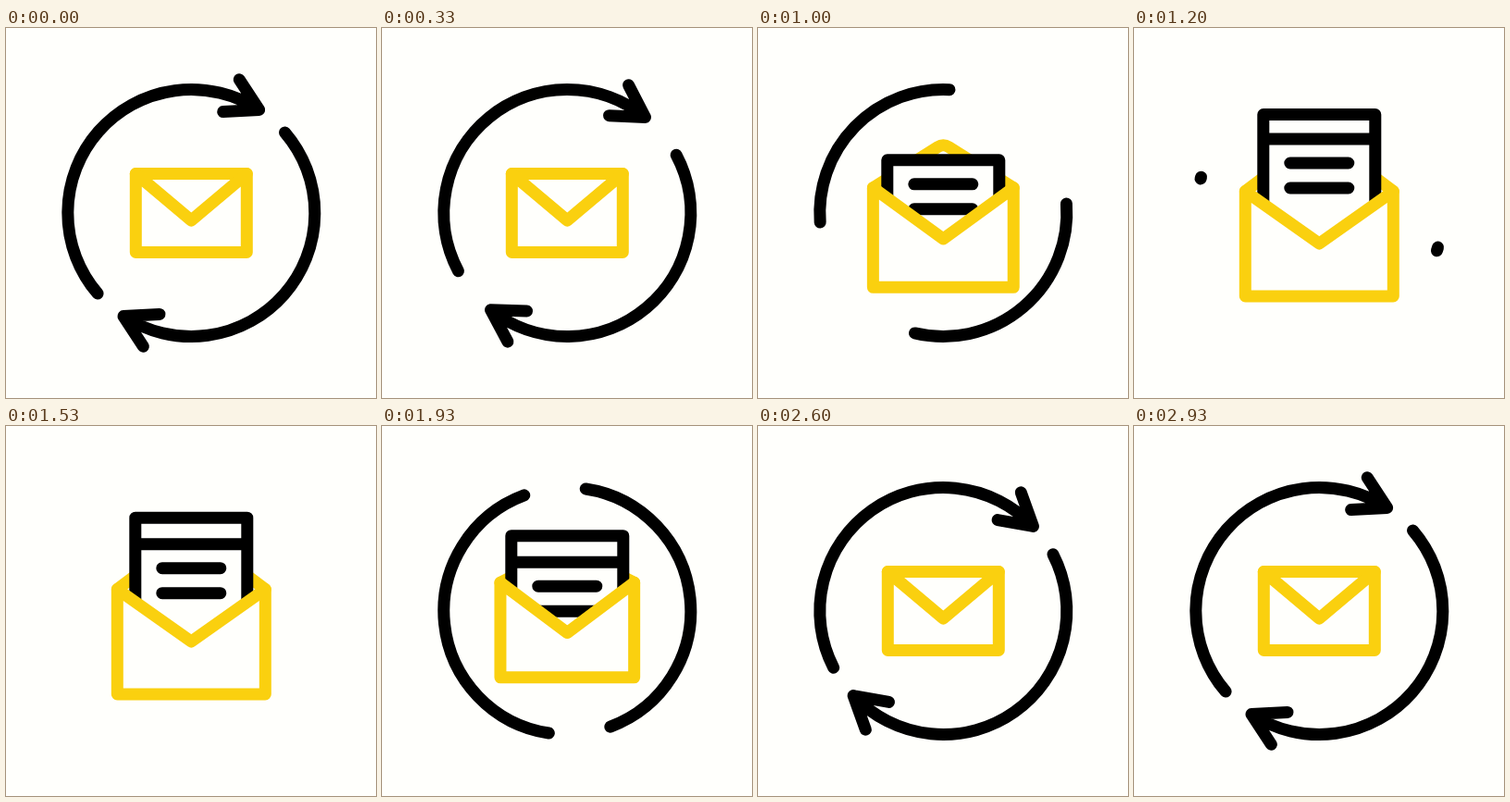
These frames come from a looping animation (400 px wide and 400 px high, 3000 ms). An HTML page:

```html
<!DOCTYPE html>
<html lang="en">
<head>
<meta charset="utf-8">
<title>Mail cycle</title>
<style>
  html, body { margin: 0; width: 100%; height: 100%; overflow: hidden; background: #fffffc; }
  svg { display: block; width: 100%; height: 100%; }
  path { fill: none; stroke-width: 13; stroke-linecap: round; stroke-linejoin: round; }
  .ink { stroke: #000; }
  .gold { stroke: #fad00f; }
  .solid { fill: #fffffc; }
</style>
</head>
<body>
<svg viewBox="-0.3 0 400 400">
  <path id="ringA" class="ink"/>
  <path id="ringB" class="ink"/>
  <path id="flap" class="gold solid"/>
  <path id="paper" class="ink solid"/>
  <path id="lines" class="ink"/>
  <path id="front" class="gold solid"/>
</svg>
<script>
const LOOP = 3000, FPS = 15, RADIUS = 133.5, ARM = 39, RAD = Math.PI / 180;

// Cubic ease-in-out from 0 at time a to 1 at time b.
function ease(t, a, b) {
  const u = Math.min(1, Math.max(0, (t - a) / (b - a)));
  return u < 0.5 ? 4 * u ** 3 : 1 - 4 * (1 - u) ** 3;
}

// Spin, pause while the rings are gone, spin past the full turn, settle back.
const turn = t => 240 * ease(t, 0, 1410) + 137 * ease(t, 1490, 2330) - 17 * ease(t, 2400, 2933);
const sweep = t => 151 * (1 - ease(t, 806, 1256) + ease(t, 1530, 1930))
  + 13 * (1 - ease(t, 0, 640) + ease(t, 1930, 2250));
const headSize = t => 1 - ease(t, 540, 760) + ease(t, 1990, 2190);

const rise = t => ease(t, 667, 1196);
const opening = t => rise(t) - ease(t, 1504, 2443);
const paperY = t => 232 - 112 * rise(t) + 8 * ease(t, 1290, 1600) + 104 * ease(t, 1750, 2261);
const headerHeight = t => 28.5 * (ease(t, 1000, 1270) - ease(t, 1950, 2220));

const setPath = (id, d) => document.getElementById(id).setAttribute("d", d);
const polar = (x, y, r, deg) => [x + r * Math.cos(deg * RAD), y + r * Math.sin(deg * RAD)];

function drawRing(id, tail, length, size) {
  if (length < 0.5) return setPath(id, "");
  const end = tail + length, tip = polar(200, 200, RADIUS, end);
  const arm = spread => polar(...tip, ARM * size, end - 96.5 + spread);
  const head = size > 0.01 ? `M${arm(-30)}L${tip}L${arm(30)}` : "";
  setPath(id, `M${polar(200, 200, RADIUS, tail)}A${RADIUS} ${RADIUS} 0 0 1 ${tip}${head}`);
}

function drawMail(t) {
  const p = opening(t), bar = paperY(t), header = bar - headerHeight(t);
  const left = 140 - 20 * p, right = 400 - left;
  const top = 157.5 + 19 * p, bottom = 242.5 + 47.5 * p;

  // The peak is broadly rounded while the flap is nearly shut.
  const peak = 157.5 - 41 * p, bend = 6 + 45 * Math.exp(-p * 8);
  const shoulder = peak + (top - peak) * bend / (200 - left);
  setPath("flap", `M${left} ${top}L${200 - bend} ${shoulder}Q200 ${peak} ${200 + bend} ${shoulder}L${right} ${top}`);

  // Anything below y 234 stays hidden behind the envelope front.
  const line = y => `M168.5 ${Math.min(y, 234)}H231.5`;
  setPath("paper", p ? `M139.5 236V${header}H260.5V236M139.5 ${bar}H260.5` : "");
  setPath("lines", line(bar + 26) + line(bar + 53));

  setPath("front", `M${left} ${top}L200 ${208 + 25 * p}L${right} ${top}V${bottom}H${left}Z`);
}

function render(t) {
  const angle = 139.3 + turn(t), size = headSize(t);
  drawRing("ringA", angle, sweep(t - 7), size);
  drawRing("ringB", angle + 180, sweep(t + 7), size);
  drawMail(t);
}

function tick() {
  const t = performance.now() % LOOP;
  render(Math.floor((t + 4) * FPS / 1000) * 1000 / FPS % LOOP);
  requestAnimationFrame(tick);
}
tick();
</script>
</body>
</html>
```
